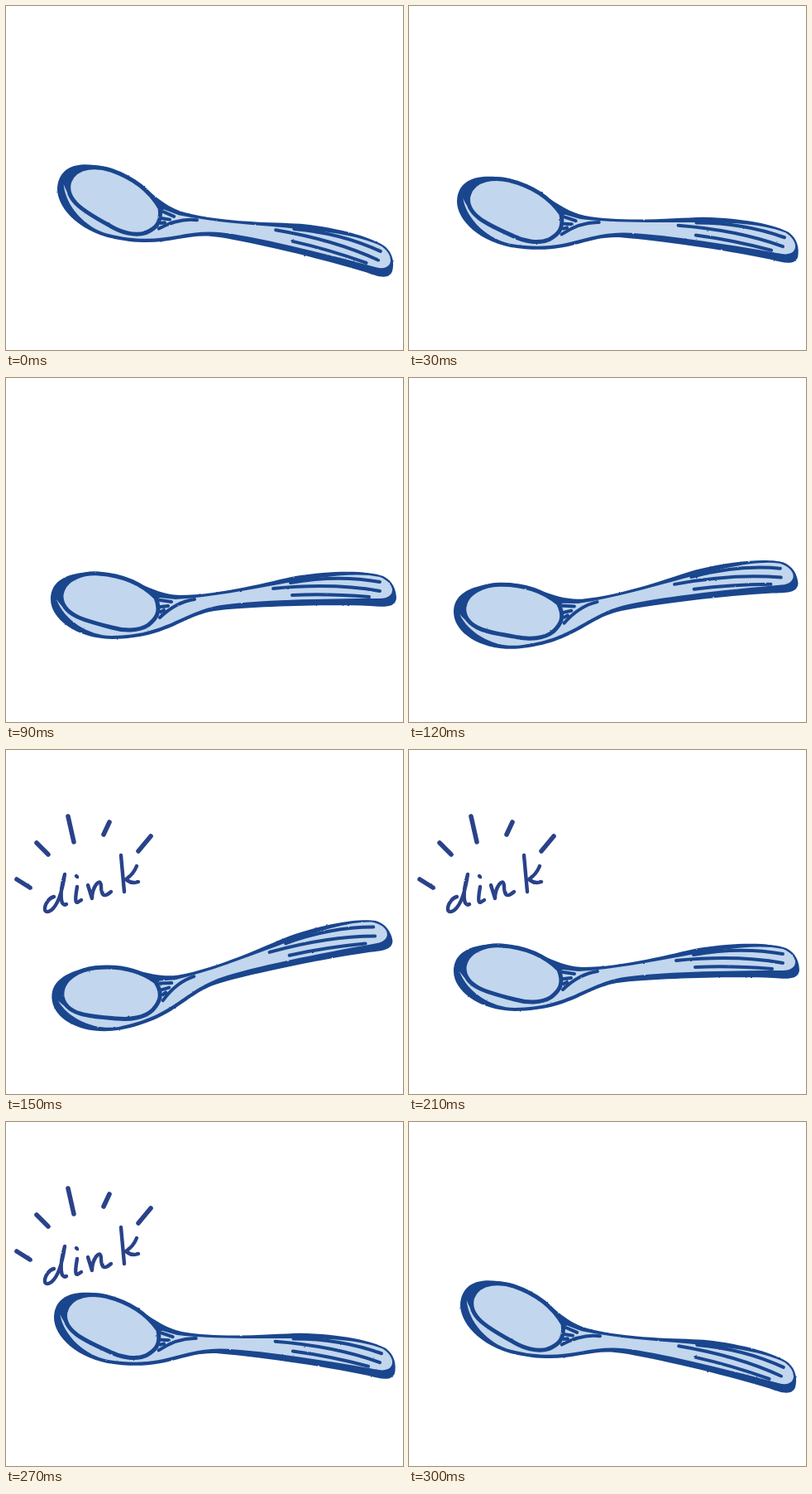
These frames come from a looping animation (480x415 px, 0.72 s). An HTML page:

```html
<!DOCTYPE html>
<html lang="en">
<head>
<meta charset="utf-8">
<title>Clinking spoon</title>
<style>
  html, body { margin: 0; height: 100%; overflow: hidden; background: #fff; }
  svg { display: block; fill: none; stroke-linecap: round; stroke-linejoin: round; }
  #spoon { stroke: #1a468e; stroke-width: 4; }
  #clink { stroke: #2a4289; stroke-width: 4.4; }
  .dark { fill: #1a468e; stroke: none; }
  .light { fill: #c2d6ee; stroke: none; }
  .hollow { fill: #c2d6ee; stroke-width: 5; }
  .rays { stroke-width: 5.6; }
</style>
</head>
<body>
<svg width="480" height="415" viewBox="0 0 480 415">
  <filter id="rough" filterUnits="userSpaceOnUse" x="0" y="0" width="480" height="415" color-interpolation-filters="sRGB">
    <feTurbulence type="fractalNoise" baseFrequency=".3" seed="4"/>
    <feDisplacementMap in="SourceGraphic" scale="2" xChannelSelector="R" yChannelSelector="G"/>
  </filter>
  <g filter="url(#rough)">
    <g id="spoon">
      <!-- silhouette, rim with handle, hollow of the bowl -->
      <path class="dark" d="M54 267C54 243 76 235 104 234C150 233 172 261 210 262C260 262 320 245 350 239
        C400 231 440 233 456 239C468 245 472 256 472 266C470 278 456 276 440 275C380 273 300 276 260 280
        C214 284 200 314 128 315C84 314 54 290 54 267Z"/>
      <path class="light" d="M61 267C70 292 100 311 128 311C195 310 212 282 260 274C300 268 380 266 452 266
        C472 266 472 248 452 240C420 233 370 242 335 248C290 256 250 264 205 267L186 265L150 304
        C100 300 74 286 61 267Z"/>
      <path class="hollow" d="M67 262C70 240 96 235 112 236C140 238 164 248 181 265C188 282 182 290 172 298
        C160 306 142 305 128 301C96 293 66 286 67 262Z"/>
      <!-- neck crease, hatching and grooves -->
      <path d="M186 289Q206 270 228 267M186 268L200 270M187 276L196 275M187 282L191 280"/>
      <path d="M344 247Q400 237 452 246M323 254Q395 247 452 257M346 262Q390 260 439 264"/>
    </g>
    <g id="clink">
      <path d="M58 177C46 180 42 202 55 193Q66 184 71 150C64 174 66 190 73 186M85 152L86 153
        M86 165C82 188 85 185 91 181M99 163L104 179C104 166 114 152 115 164C115 178 120 177 127 171
        M139 127L143 171M158 140Q154 150 145 156Q152 162 160 159"/>
      <path class="rays" d="M13 156L29 166M37 112L51 126M75 80L82 111M125 87L118 102M175 104L160 122"/>
    </g>
  </g>
</svg>
<script>
const LOOP = 720, STEP = 30, SWING = 5, DEGREES = 5;
const spoon = document.getElementById('spoon');
const clink = document.getElementById('clink');
const start = performance.now();

// The spoon rocks down in five steps, clinks, rocks back and rests
function draw() {
  const time = (performance.now() - start) % LOOP;
  const step = Math.min(2 * SWING, Math.floor(time / STEP));
  const angle = DEGREES * (Math.abs(SWING - step) - 2);
  spoon.setAttribute('transform', `rotate(${angle} 263 274)`);
  clink.style.display = step >= SWING && step < 2 * SWING ? '' : 'none';
  requestAnimationFrame(draw);
}
draw();
</script>
</body>
</html>
```
